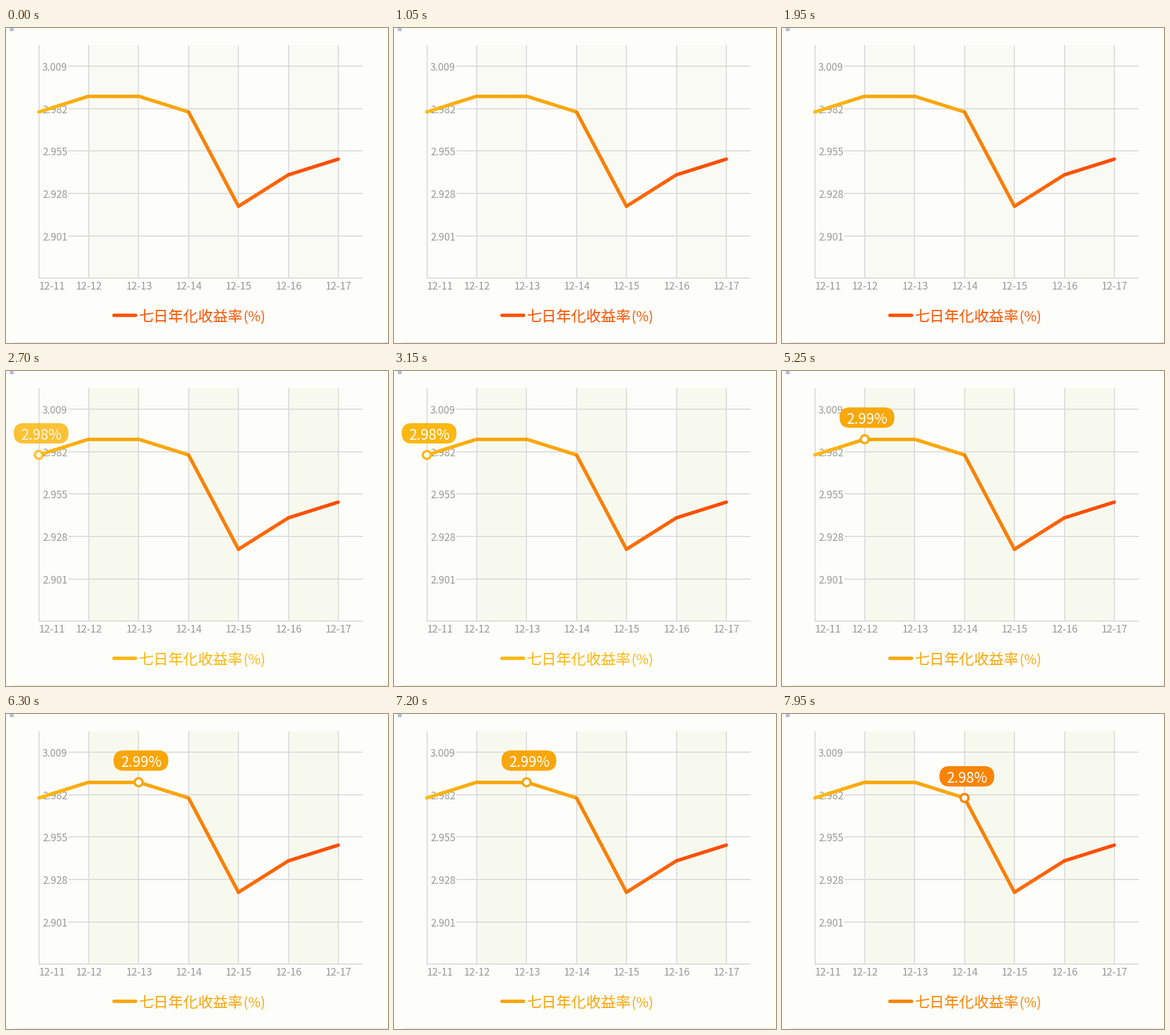
Recreate the animation shown at these times as a matplotlib script. Size 600 px wide and 495 px high, loop 8 s.

```python
import numpy as np
import matplotlib.pyplot as plt
from matplotlib.animation import FuncAnimation
from matplotlib.collections import LineCollection
from matplotlib.colors import to_rgb
from matplotlib.patches import Circle, FancyBboxPatch, Rectangle

W, H, DPI = 600, 495, 100
STEP, LOOP = 50, 8000
PT = 72 / DPI                      # points per pixel
FONT = "Noto Sans CJK JP"

VALUES = [2.98, 2.99, 2.99, 2.98, 2.92, 2.94, 2.95]
XS = 51.5 + 78.4 * np.arange(7)
YS = 127 + (2.982 - np.array(VALUES)) * 2470
SEGMENTS = [("#fdbb18", "#faa80c"), ("#faa60a", "#faa60a"),
            ("#faa60a", "#faa60f"), ("#f88400", "#fb7d06"),
            ("#ff6e08", "#ff5f00"), ("#fb5400", "#fc4c00")]
TIPS = ["#fbb813", "#f9a80b", "#f9a60a", "#f98404"]
FIRST, PERIOD = 2550, 1650         # when the tips start to show

fig = plt.figure(figsize=(W / DPI, H / DPI), dpi=DPI, facecolor="#fdfdfa")
ax = fig.add_axes([0, 0, 1, 1])
ax.set_xlim(0, W)
ax.set_ylim(H, 0)
ax.axis("off")


def label(x, y, s, px, color="#999999", ha="left", z=3):
    return ax.text(x, y, s, fontsize=px * PT, color=color, ha=ha,
                   va="baseline", family=FONT, zorder=z)


def rule(x0, y0, x1, y1, color="#dbdcdb", width=1.8):
    ax.plot([x0, x1], [y0, y1], color=color, lw=width * PT,
            solid_capstyle="butt", zorder=2)


def mix(a, b, k):
    return (1 - k) * np.array(to_rgb(a)) + k * np.array(to_rgb(b))


# backdrop and grid
ax.add_patch(Rectangle((6, 0), 6, 5, color="#b3bfd3", lw=0))
rule(12, 494, W, 494, "#e6e6e4", 1.4)
bands = [ax.add_patch(Rectangle((XS[i], 27), 78.4, 366, lw=0, zorder=1))
         for i in (1, 3, 5)]
for x in XS:
    rule(x, 27, x, 393)
rule(51, 393, 560, 393)
for i in range(5):
    y = 60 + 66.7 * i
    rule(98, y, 560, y)
    label(57, y + 7, f"{3.009 - 0.027 * i:.3f}", 15.8)
for i, x in enumerate(XS):
    label(72.3 if i == 0 else x + 0.7, 410.8, f"12-{11 + i}", 16.2, ha="center")

# curve, each segment with its own gradient
pieces, tints = [], []
for i, (a, b) in enumerate(SEGMENTS):
    k = np.linspace(0, 1, 13)
    px = XS[i] + k * (XS[i + 1] - XS[i])
    py = YS[i] + k * (YS[i + 1] - YS[i])
    for j in range(12):
        pieces.append([(px[j], py[j]), (px[j + 1], py[j + 1])])
        tints.append(mix(a, b, (j + 0.5) / 12))
ax.add_collection(LineCollection(pieces, colors=tints, linewidths=5.4 * PT,
                                 capstyle="round", zorder=4))

# legend
key, = ax.plot([169, 203], [451.3, 451.3], lw=5.4 * PT,
               solid_capstyle="round", zorder=4)
legend = [key, label(208.5, 461, "七日年化收益率", 23.4),
          label(373, 461, "(%)", 21.3)]


def make_tip(i):
    x, y, color = XS[i], YS[i], TIPS[i]
    cx, cy = x + 3.6, y - 34
    pill = FancyBboxPatch((cx - 27, cy), 54, 0, fc=color, lw=0, zorder=6,
                          boxstyle="round,pad=16,rounding_size=16")
    ring = Circle((x, y), 8, fc=color, lw=0, zorder=6)
    hole = Circle((x, y), 4.4, fc="white", lw=0, zorder=7)
    for p in (pill, ring, hole):
        ax.add_patch(p)
    text = label(cx, cy + 10, f"{VALUES[i]:.2f}%", 22.5, "white", "center", 7)
    return [pill, ring, hole, text]


tips = [make_tip(i) for i in range(4)]


def opacity(i, t):
    start = FIRST + PERIOD * i
    shown = np.interp(t, [start - 150, start, start + 150, start + 300],
                      [0, 0.45, 0.85, 1])
    end = start + PERIOD
    return shown * np.interp(t, [end - 300, end - 150, end], [1, 0.4, 0])


def draw(n):
    t = n * STEP // 150 * 150
    color = "#fb5400"
    for i, tip in enumerate(tips):
        a = opacity(i, t)
        for part in tip:
            part.set_alpha(a)
            part.set_visible(a > 0)
        start = FIRST + PERIOD * i
        color = mix(color, TIPS[i], np.interp(t, [start - 150, start + 150], [0, 1]))
    for part in legend:
        part.set_color(color)
    for band in bands:
        band.set_facecolor("#f9faf3" if t < FIRST else "#f8f9ee")
    return []


anim = FuncAnimation(fig, draw, frames=LOOP // STEP, interval=STEP,
                     init_func=lambda: draw(0), repeat=True, repeat_delay=0)
plt.show()
```
